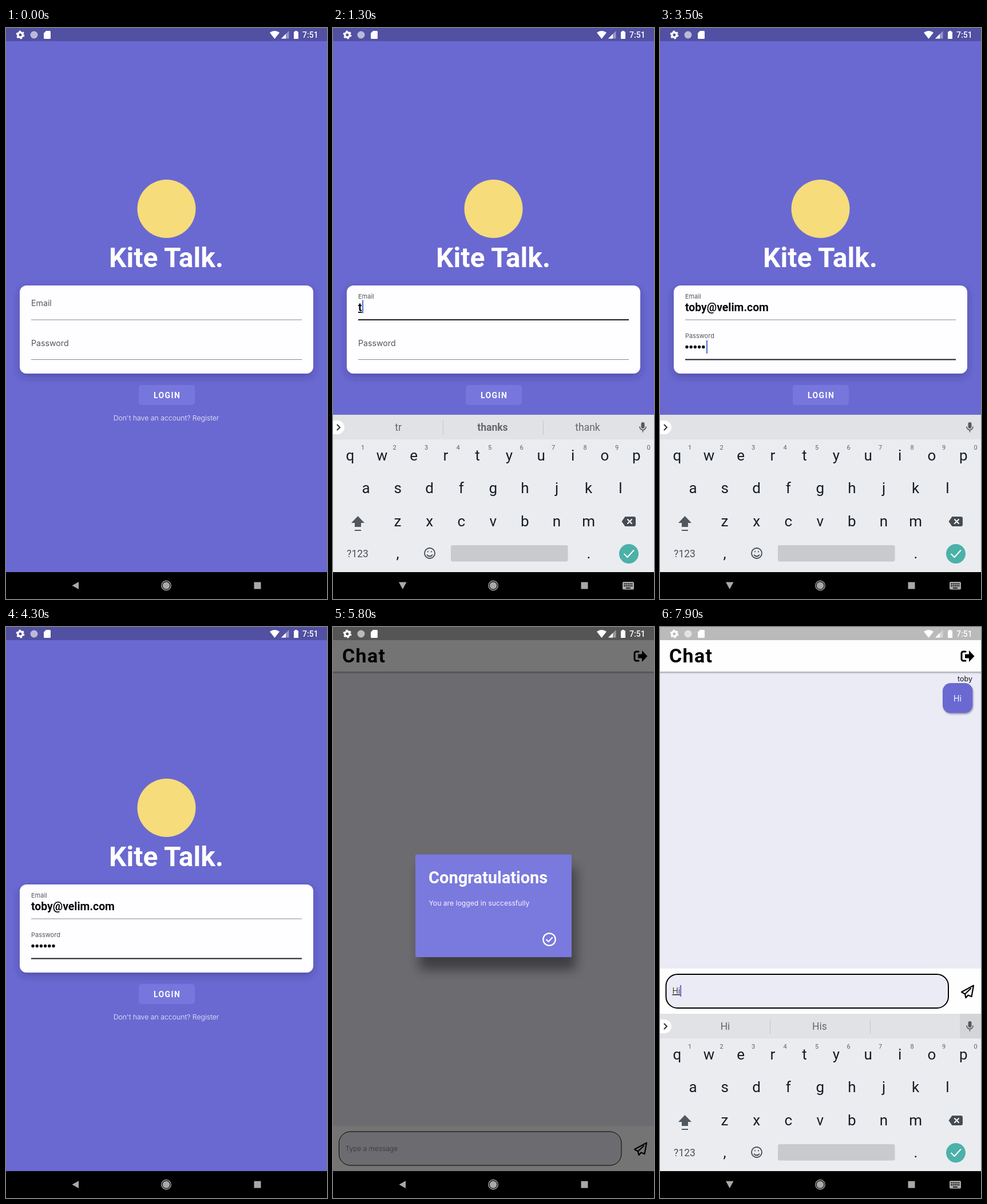
An HTML page for the animation above (8 s loop, 561 by 998 pixels).

```html
<!DOCTYPE html>
<html lang="en">
<head>
<meta charset="utf-8">
<style>
  html, body { margin: 0; width: 100%; height: 100%; overflow: hidden; background: #000; }
  svg { display: block; font-family: Roboto, sans-serif; }
  .soft { font-family: Inter, sans-serif; }
  .mid { text-anchor: middle; }
  .bold { font-weight: 700; }
  .line { fill: none; stroke-linecap: round; stroke-linejoin: round; }
</style>
</head>
<body>
<svg width="561" height="998" viewBox="0 0 561 998">
  <defs>
    <filter id="cardShade" x="-10%" y="-20%" width="120%" height="150%">
      <feDropShadow dx="0" dy="5" stdDeviation="7" flood-color="#25246a" flood-opacity=".38"/>
    </filter>
    <filter id="boxShade" x="-20%" y="-20%" width="150%" height="150%">
      <feDropShadow dx="7" dy="22" stdDeviation="10" flood-color="#000" flood-opacity=".42"/>
    </filter>
    <filter id="lowShade" x="-20%" y="-20%" width="140%" height="150%">
      <feDropShadow dx="1" dy="2" stdDeviation="1.8" flood-color="#000" flood-opacity=".32"/>
    </filter>
  </defs>

  <g id="login">
    <path fill="#6a69d1" d="M0 0H561V951H0z"/>
    <path fill="#5150a2" d="M0 0H561V23H0z"/>
    <circle cx="280.5" cy="316" r="51" fill="#f6dc7a"/>
    <text class="mid bold" x="280" y="418" font-size="48" fill="#fff">Kite Talk.</text>
    <rect x="24" y="450" width="513" height="154" rx="12" fill="#fefdff" filter="url(#cardShade)"/>
    <g class="soft" fill="#55545c">
      <text id="emailLabel" x="44">Email</text>
      <text id="passLabel" x="44">Password</text>
    </g>
    <path id="emailLine" d="M44 510H517"/>
    <path id="passLine" d="M44 579.5H517"/>
    <text id="email" class="bold" x="44" y="495" font-size="19.4" fill="#08080c"></text>
    <line id="dots" class="line" x1="47" y1="557.5" y2="557.5" stroke="#08080c" stroke-width="5.4" stroke-dasharray="0 7.2"/>
    <rect id="loginCaret" width="2" height="23" fill="#4a74d4"/>
    <rect x="232" y="624" width="98" height="35" rx="5" fill="#7776dc"/>
    <text class="bold" x="258" y="646.5" font-size="14" letter-spacing="1.4" fill="#fff">LOGIN</text>
    <text class="soft mid" x="280" y="686" font-size="12.3" font-weight="300" fill="#f3f2fc">Don't have an account? Register</text>
  </g>

  <g id="chat">
    <path fill="#ebebf6" d="M0 0H561V951H0z"/>
    <g id="message">
      <text class="soft" x="546" y="95" text-anchor="end" font-size="12.5" fill="#16161a">toby</text>
      <rect x="494" y="98" width="52.5" height="52.5" rx="14" fill="#6a69d1" filter="url(#lowShade)"/>
      <text class="soft mid" x="520" y="130" font-size="14" fill="#fff">Hi</text>
    </g>
    <path fill="#fefefe" filter="url(#lowShade)" d="M-9 23H570V78H-9z"/>
    <path fill="#bababa" d="M0 0H561V23H0z"/>
    <text class="bold" x="16" y="62" font-size="34" letter-spacing="1.3">Chat</text>
    <path class="line" stroke="#000" stroke-width="3" d="M534 43H530a3 3 0 0 0-3 3V56a3 3 0 0 0 3 3H534"/>
    <path d="M533 47.5h7v-6.5l9.5 10-9.5 10v-6.500h-7z"/>
    <g id="composer">
      <path fill="#fefefe" d="M0 597H561V676H0z"/>
      <rect id="inputBox" x="10.500" y="607" width="493.5" height="59" rx="20" fill="#ebebf6" stroke="#000"/>
      <text id="hint" class="soft" x="21.500" y="641" font-size="12" font-weight="300" fill="#6b6b75">Type a message</text>
      <text id="typed" class="soft" x="21.500" y="641" font-size="14" font-weight="300" fill="#111" text-decoration="underline"></text>
      <rect id="chatCaret" y="626" width="2" height="20" fill="#6b5fd0"/>
      <path class="line" stroke="#000" stroke-width="2.2" d="M548 626.500L527 638l6 3.500L534.500 648l4-4.500L544.500 646zM533 641.500L543 632"/>
    </g>
  </g>

  <g id="dialog">
    <path opacity=".54" d="M0 0H561V951H0z"/>
    <rect x="144" y="397.500" width="273" height="179.500" rx="2" fill="#7a79dd" filter="url(#boxShade)"/>
    <text class="bold" x="167" y="448" font-size="29" fill="#fff">Congratulations</text>
    <text class="soft" x="167.500" y="487" font-size="12.2" fill="#f5f4fd">You are logged in successfully</text>
    <g class="line" stroke="#fff" stroke-width="2.300">
      <circle cx="378" cy="546" r="10.700"/>
      <path d="M373 546.500l3.500 3.500 6.500-7"/>
    </g>
  </g>

  <g id="keyboard">
    <path fill="#ebecf0" d="M0 676H561V951H0z"/>
    <path fill="#e1e2e5" d="M0 676H561V719H0z"/>
    <path id="micBox" fill="#d4d5d8" d="M524 676H561V719H524z"/>
    <g id="strip">
      <path fill="#fff" d="M0 686H8a12 12 0 0 1 0 24H0z"/>
      <path id="rules" stroke="#c3c5c8" d="M192.500 686V711M367.500 686V711"/>
    </g>
    <path class="line" stroke="#333" stroke-width="2" d="M7.500 693.500l4.500 4.500-4.500 4.500"/>
    <g id="words" class="mid" font-size="17.500" fill="#63676c"></g>
    <rect x="538.500" y="689" width="6" height="11" rx="3" fill="#55595e"/>
    <path class="line" stroke="#55595e" stroke-width="1.600" d="M536 697a5.500 5.500 0 0 0 11 0M541.500 703v3"/>
    <g id="keys" class="mid" font-size="26" fill="#151c24"></g>
    <g id="digits" class="mid" font-size="11" fill="#5b6066"></g>
    <path fill="#50575f" d="M43.500 853l11.500 12h-6v7h-11v-7h-6zM38 877h11v2H38z"/>
    <path fill="#454c54" d="M504.500 862.500l6-8.500H526a3 3 0 0 1 3 3v11a3 3 0 0 1-3 3H510.500z"/>
    <path class="line" stroke="#fff" stroke-width="2" d="M515 859l7 7m0-7l-7 7"/>
    <text class="mid" x="43" y="925" font-size="17.500" fill="#4b5258">?123</text>
    <g class="line" stroke="#454c54" stroke-width="1.800">
      <circle cx="169" cy="918" r="9"/>
      <path d="M164.500 921a5 4 0 0 0 9 0M166 915v.5M172 915v.5"/>
    </g>
    <rect x="206" y="904" width="204.500" height="28.500" rx="3" fill="#c8cacd"/>
    <circle cx="517" cy="919" r="17" fill="#4bb1a9"/>
    <path class="line" stroke="#fff" stroke-width="2" d="M509 919.500l5.500 5.500L525.500 913"/>
  </g>

  <g id="status" fill="#fff">
    <circle cx="25" cy="12" r="4.200" fill="none" stroke="#fff" stroke-width="3.400"/>
    <circle cx="25" cy="12" r="6.300" fill="none" stroke="#fff" stroke-width="2.200" stroke-dasharray="3.300 3.300"/>
    <circle cx="49" cy="12" r="6.500" opacity=".6"/>
    <path d="M70 5h6.500a1.500 1.500 0 0 1 1.500 1.500v11a1.500 1.500 0 0 1-1.500 1.500h-9a1.500 1.500 0 0 1-1.500-1.500V9z"/>
    <path d="M461 8q8.500-6 17 0L469.500 19z"/>
    <path opacity=".4" d="M494.500 5V18.500H481z"/>
    <path d="M489 10.500V18.500H481z"/>
    <path d="M505 5h4v1.500h2V19h-8V6.500h2z"/>
    <text x="518" y="17" font-size="14" font-weight="500">7:51</text>
  </g>

  <path d="M0 951H561V998H0z"/>
  <g fill="#a9a9a9">
    <path id="back" d="M115.500 974.500L127 968v13z"/>
    <circle cx="280" cy="974.500" r="6.300"/>
    <circle cx="280" cy="974.500" r="8.200" fill="none" stroke="#a9a9a9" stroke-width="1.400"/>
    <path d="M433.500 968.500h12v12h-12z"/>
    <g id="keyIcon">
      <rect x="506" y="968" width="20" height="13.500" rx="2"/>
      <path stroke="#000" stroke-width="2" stroke-dasharray="2 1.200" d="M508.500 971.500h15.500M508.500 975h15.500"/>
      <path stroke="#000" stroke-width="1.600" d="M512 978.800h8"/>
    </g>
  </g>
</svg>
<script>
const LOOP = 8000, STEP = 100;
const EMAIL = "toby@velim.com";
const ui = {};
document.querySelectorAll("[id]").forEach(el => ui[el.id] = el);

const clamp = v => Math.max(0, Math.min(1, v));
const ramp = (t, from, to) => clamp((t - from) / (to - from));
const count = (t, start, gap, max) => t < start ? 0 : Math.min(max, 1 + Math.floor((t - start) / gap));
const show = (el, on) => el.setAttribute("visibility", on ? "visible" : "hidden");
const set = (el, attrs) => { for (const k in attrs) el.setAttribute(k, attrs[k]); };

function addText(parent, text, x, y) {
  const el = document.createElementNS("http://www.w3.org/2000/svg", "text");
  el.textContent = text;
  set(el, { x, y });
  parent.append(el);
  return el;
}

const PITCH = 55.6;
[["qwertyuiop", 30, 756], ["asdfghjkl", 57.5, 813], ["zxcvbnm", 113, 871]].forEach(([row, x, y]) =>
  [...row].forEach((key, i) => addText(ui.keys, key, x + PITCH * i, y)));
addText(ui.keys, ",", 113, 927);
addText(ui.keys, ".", 447, 927);
[..."1234567890"].forEach((digit, i) => addText(ui.digits, digit, 52 + 55.5 * i, 737));
const words = [114, 279, 445].map(x => addText(ui.words, "", x, 704));

function field(label, line, rise, y, focused) {
  set(label, { y: y - 13.3 * rise, "font-size": 14.2 - 3.2 * rise });
  set(line, { stroke: focused ? "#1c1c20" : "#88878f", "stroke-width": focused ? 2 : 1 });
}

function suggestions(chatting, letters, hi) {
  if (chatting) return [["thanks", "I", "we"], ["H", "Hi", "He"], ["Hi", "His", ""]][hi];
  if (letters > 4) return null;
  return [["I", "the", "thanks"], ["tr", "thanks", "thank"], ["to", "top", "too"],
          ["tob", "top", "today"], ["toby", "today", "to"]][letters];
}

function draw(t) {
  const chatting = t >= 5600;
  const letters = count(t, 1300, 109, EMAIL.length);
  const passFocus = t >= 2900;
  const mailFocus = t >= 400 && !passFocus;
  const dots = count(t, 3100, 100, 6);
  const hi = count(t, 6900, 100, 2);

  // keyboard
  const up = chatting ? ramp(t, 6200, 6550) : ramp(t, 400, 700) * (1 - ramp(t, 3900, 4100));
  const open = up > 0;
  set(ui.keyboard, { opacity: up, transform: `translate(0 ${70 * (1 - up) ** 3})` });
  const list = passFocus && !chatting ? null : suggestions(chatting, letters, hi);
  words.forEach((el, i) => {
    el.textContent = list ? list[i] : "";
    el.setAttribute("font-weight", i === 1 && !chatting ? 700 : 400);
  });
  show(ui.strip, up === 1);
  set(ui.rules, { opacity: list ? 1 : 0 });
  show(ui.micBox, chatting);
  show(ui.keyIcon, open);
  set(ui.back, { d: open ? "M115 968.500h13.500L121.750 981z" : "M115.500 974.500L127 968v13z" });

  // login form
  field(ui.emailLabel, ui.emailLine, ramp(t, 400, 600), 486, mailFocus);
  field(ui.passLabel, ui.passLine, ramp(t, 2800, 3000), 555.5, passFocus);
  ui.email.textContent = EMAIL.slice(0, letters);
  set(ui.email, { "text-decoration": mailFocus && letters < 5 ? "underline" : "none" });
  show(ui.dots, dots);
  set(ui.dots, { x2: 47.1 + 7.2 * Math.max(0, dots - 1) });
  show(ui.loginCaret, open && !chatting);
  set(ui.loginCaret, passFocus
    ? { x: 45 + 7.2 * dots, y: 546 }
    : { x: 44.5 + (letters ? ui.email.getComputedTextLength() : 0), y: 475.5 });

  // chat screen
  set(ui.chat, { opacity: ramp(t, 4800, 5100) });
  set(ui.dialog, { opacity: ramp(t, 5200, 5500) * (1 - ramp(t, 5950, 6150)) });
  const focused = chatting && open;
  set(ui.composer, { transform: `translate(0 ${focused ? 0 : 275})` });
  set(ui.inputBox, { "stroke-width": focused ? 2 : 1 });
  show(ui.hint, !hi);
  ui.typed.textContent = "Hi".slice(0, hi);
  show(ui.chatCaret, focused);
  set(ui.chatCaret, { x: 21.5 + (hi ? ui.typed.getComputedTextLength() : 0) });
  show(ui.message, t >= 7400);
}

function tick(now) {
  draw(Math.floor(now % LOOP / STEP) * STEP);
  requestAnimationFrame(tick);
}
draw(0);
requestAnimationFrame(tick);
</script>
</body>
</html>
```
